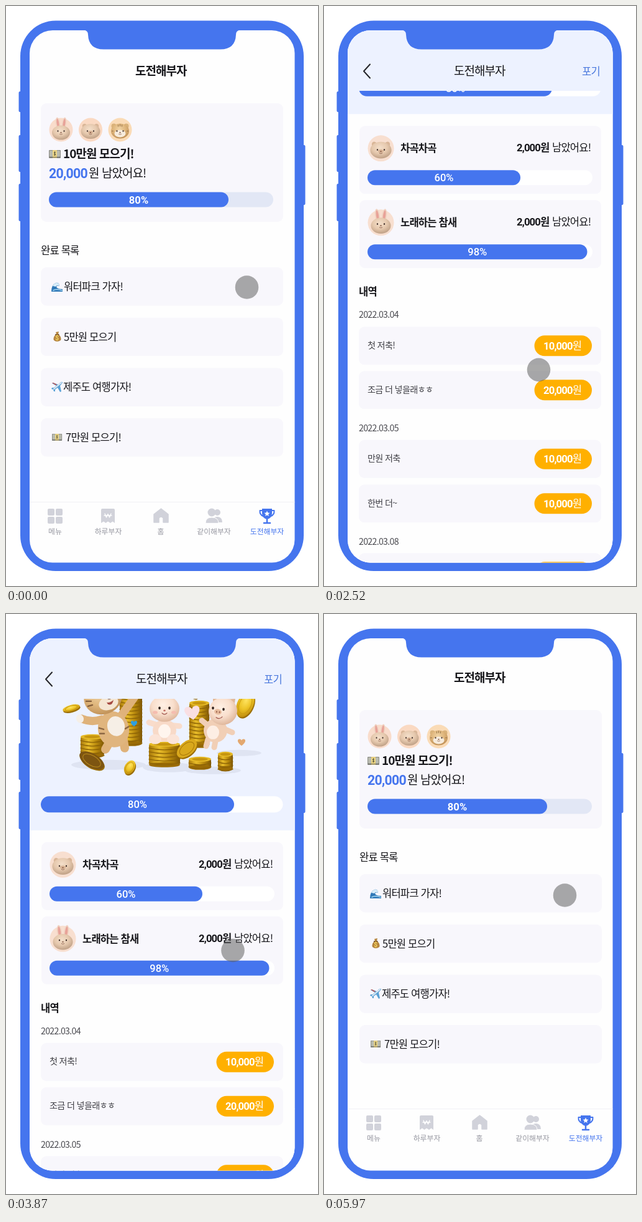
Animation, 502 px wide and 930 px high, one loop 6000 ms. Source, as an HTML page:

```html
<!DOCTYPE html>
<html lang="ko">
<head>
<meta charset="utf-8">
<style>
html, body { margin: 0; width: 100%; height: 100%; overflow: hidden; background: #fff; }
svg { display: block; }
text { font-family: 'Noto Sans CJK KR', 'Noto Sans CJK', 'Noto Sans', sans-serif; letter-spacing: -.05em; white-space: pre; }
.num { font-family: Roboto, 'Noto Sans CJK KR', 'Noto Sans CJK', sans-serif; }
.tab { letter-spacing: 0; }
</style>
</head>
<body>
<svg id="stage" width="502" height="930" viewBox="0 0 502 930"></svg>
<script>
const BLUE = '#4575ee', CARD = '#f8f7fc', SKY = '#edf2ff', INK = '#17171b', GREY = '#d1d2da';

// ---- drawing helpers ----
const rect = (x, y, w, h, r, fill) => `<rect x="${x}" y="${y}" width="${w}" height="${h}" rx="${r}" fill="${fill}"/>`;
const oval = (x, y, rx, ry, fill, rot = 0) =>
  `<ellipse rx="${rx}" ry="${ry}" fill="${fill}" transform="translate(${x} ${y}) rotate(${rot})"/>`;
const path = (d, fill, stroke = 'none', width = 0) =>
  `<path d="${d}" fill="${fill}" stroke="${stroke}" stroke-width="${width}" stroke-linecap="round" stroke-linejoin="round"/>`;
const line = (d, stroke, width) => path(d, 'none', stroke, width);
const at = (x, y, s, body) => `<g transform="translate(${x} ${y}) scale(${s})">${body}</g>`;
const text = (x, y, size, str, weight = 400, fill = INK, extra = '') =>
  `<text x="${x}" y="${y}" font-size="${size}" font-weight="${weight}" fill="${fill}" ${extra}>${str}</text>`;
const NUM = 'class="num"', TIGHT = 'class="num" style="letter-spacing:-.033em"';

function bar(x, y, w, h, done, label, back, weight) {
  return rect(x, y, w, h, h / 2, back) + rect(x, y, done, h, h / 2, BLUE) +
    text(x + done / 2, y + h / 2 + 6, 16.6, label, weight, '#fff',
      'class="num" style="letter-spacing:0" text-anchor="middle"');
}

// ---- small pictures ----
const bill = (x, y, s) => at(x, y, s,
  rect(0, 0, 19, 13, 1, '#8b8c86') + rect(1, 1, 17, 9.5, 1, '#b9bbb0') + rect(6, 0, 7, 13, 0, '#e3cb7c') +
  oval(9.5, 5.5, 3.4, 4, '#f2dd8e') +
  line('M11 4Q9.5 2.8 8.3 4Q8 5.5 9.5 5.8Q11.2 6.4 10.8 7.6Q9.5 8.6 8 7.6M9.5 2.5V8.8', '#5f5a3c', 1) +
  line('M1 11.7H18', '#6b6d68', 1));

const wave = at(73, 443, 1,
  path('M0 15Q0 4 7 1Q13 0 13 6Q10 4 8 7Q9 11 18 11V15Z', '#2f79b8') +
  path('M2 6Q6 -1 12 2Q13 4 13 6Q10 3 7 7Z', '#d9eefa') + line('M3 13Q8 10 17 13', '#a9daf3', 1.5));

const bag = at(76, 522, 1,
  path('M4 1L9 0L8 4Q14 9 12 14Q6 18 1 14Q-1 9 5 4Z', '#b5853f') + line('M3.5 5H9', '#6d451c', 1.5) +
  text(3.2, 14, 10, '$', 700, '#f5d560', NUM));

const plane = at(73, 602, 1,
  path('M1 3L3 2L11 5L15 1Q18 0 18 2L14 7L16 16L14 17L10 10L6 13L6 16L4 16L3 13L0 12L1 10L4 10L8 7Z', '#5aa2d6') +
  line('M4 12L16 2', '#dce8f2', 2) + path('M1 2L3 2L9 5L7 6Z', '#c9504a'));

const ear = (x, tilt) => oval(x, -10, 3.6, 10, '#f0d3c2', tilt) + oval(x, -10, 1.9, 8, '#e8a298', tilt);
const faces = {
  rabbit: ear(-5, -8) + ear(5, 8) + oval(0, 4.5, 14.5, 11.5, 'url(#clay)'),
  pig: oval(-9, -5, 4, 5, '#d9b698', -30) + oval(9, -5, 4, 5, '#d9b698', 30) +
    oval(0, 2.5, 15.5, 12, 'url(#clay)') + oval(0, 4, 4, 2.6, '#d8b496'),
  tiger: oval(-10, -6, 4, 4, '#d9b27a') + oval(10, -6, 4, 4, '#d9b27a') + oval(0, 2, 14.5, 12, 'url(#sand)') +
    oval(0, 6, 9, 6, '#f6ebdc') + line('M-3 -8V-5.5M0 -9V-6M3 -8V-5.5M-13 2H-11M13 2H11', '#9a774e', 1.1)
};
const avatar = (kind, x, y, r, back) => at(x, y, r / 19,
  oval(0, 0, 19, 19, back) + faces[kind] + oval(-5, 2, 1, 1.2, '#3a2a26') + oval(5, 2, 1, 1.2, '#3a2a26') +
  oval(0, 4.5, 1.2, .9, '#8b5f4c') + line('M-2 7Q0 8.5 2 7', '#8b5f4c', .8));

// ---- money illustration ----
function coin(x, y, rx, ry, rot, face = 'url(#coin)', rim = '#c99a10') {
  return oval(x + 1, y + 2, rx, ry, '#9a6d06', rot) + oval(x, y, rx, ry, face, rot) +
    `<ellipse rx="${rx * .72}" ry="${ry * .72}" fill="none" stroke="${rim}" transform="translate(${x} ${y}) rotate(${rot})"/>`;
}
function pile(x, top, bottom, half) {
  let out = rect(x - half, top, half * 2, bottom - top, 3, 'url(#pile)') + oval(x, bottom, half, 4, '#9b6c05');
  for (let y = top + 6; y < bottom + 2; y += 6)
    out += line(`M${x - half} ${y}Q${x} ${y + 6} ${x + half} ${y}`, '#8b6206', 1.3);
  return out + oval(x, top, half, 4, '#e5b925') + oval(x, top, half * .7, 2.4, '#c6950f');
}
const heart = (x, y, s, fill, rot = 0) =>
  `<g transform="translate(${x} ${y}) rotate(${rot}) scale(${s})">${path('M0 .9C-1.3 0 -1.2 -.9 -.55 -.9Q-.1 -.9 0 -.5Q.1 -.9 .55 -.9C1.2 -.9 1.3 0 0 .9Z', fill)}</g>`;

const tiger =
  line('M154 406Q138 412 122 405', '#dfb27a', 13) + oval(119, 405, 6, 7, '#f5efe8', -20) +
  line('M184 402L207 370', '#dfb27a', 13) + line('M168 440L160 454', '#dfb27a', 14) + line('M189 440L191 452', '#dfb27a', 14) +
  oval(173, 422, 25, 29, '#e0b57e', -12) + oval(177, 417, 14, 16, '#f6efe6', -12) +
  line('M150 420L157 422M151 429L158 429M197 418L192 421', '#8d6844', 2.5) +
  oval(132, 353, 9, 9, '#cf9f64') + oval(173, 346, 8, 8, '#cf9f64') +
  oval(156, 371, 31, 27, 'url(#sand)', -18) + oval(165, 380, 16, 11, '#f5e6d2', -18) +
  line('M144 350L148 357M151 347L154 354M159 346L160 351M128 370L136 371M129 377L137 377M132 385L139 383', '#85603c', 2.4) +
  oval(154, 369, 2, 2.6, '#30221e') + oval(171, 364, 2, 2.6, '#30221e') +
  oval(166, 372, 3, 2, '#61382c') + path('M162 379Q168 380 173 375Q171 385 164 382Z', '#a64b43');

const rabbit =
  oval(241, 350, 7, 22, '#f9ddce', -7) + oval(269, 356, 7, 20, '#f9ddce', 14) +
  oval(241, 350, 4, 18, '#ee8f86', -7) + oval(269, 356, 4, 16, '#ee8f86', 14) +
  line('M243 415L230 411M268 416L279 417', '#f9dccb', 9) +
  oval(255, 424, 19, 18, '#f8dac8') + oval(255, 425, 10, 11, '#fff5ee') +
  oval(240, 438, 10, 8, '#fbe4d8') + oval(269, 438, 10, 8, '#fbe4d8') +
  oval(255, 389, 24, 21, 'url(#cream)') + oval(247, 388, 1.8, 2.4, '#30221e') + oval(263, 388, 1.8, 2.4, '#30221e') +
  oval(240, 395, 4, 2.5, '#f5bdb0') + oval(270, 395, 4, 2.5, '#f5bdb0') +
  oval(255, 392, 1.8, 1.3, '#bf6b60') + line('M251 396Q255 400 259 396', '#9e544b', 1.3);

const pig =
  line('M325 416L315 408M350 421L364 427M325 438L322 449M337 441L335 451', '#f1cfb6', 9) +
  oval(337, 424, 19, 19, '#f1cfb6') + oval(333, 427, 10, 11, '#fdeee4') +
  path('M333 383L333 370L348 373Z', '#e2b897') + path('M356 374L369 373L367 386Z', '#e2b897') +
  oval(349, 393, 23, 22, 'url(#cream)', -10) + oval(341, 394, 6, 4.5, '#e8bd9f', 10) +
  oval(339, 394, 1, 1.6, '#9b6350') + oval(343.5, 394.5, 1, 1.6, '#9b6350') +
  oval(333, 388, 1.8, 2.3, '#30221e') + oval(350, 390, 1.8, 2.3, '#30221e') +
  line('M338 403Q343 407 348 402', '#9e544b', 1.3);

const scene =
  oval(165, 479, 60, 8, '#dfe4f2') + oval(262, 483, 42, 8, '#dfe4f2') + oval(375, 460, 36, 5, '#dfe4f2') + oval(333, 488, 45, 6, '#dfe4f2') +
  pile(201, 354, 445, 18) + pile(139, 434, 464, 19) + pile(311, 380, 448, 16) + pile(255, 446, 479, 25) +
  pile(312, 470, 483, 18) + pile(353, 462, 485, 12) +
  coin(177, 314, 13, 15, 10) + coin(205, 338, 13, 6, -30) + coin(105, 388, 14, 5, -15) +
  coin(138, 472, 22, 11, 30, '#7d5511', '#b98a1c') +
  coin(199, 483, 8, 12, 30) + coin(320, 341, 13, 5, -22) + coin(298, 364, 12, 5, 40) + coin(385, 382, 13, 22, 25) +
  tiger + rabbit + pig + coin(291, 453, 19, 11, -40, '#d9a81c', '#a87808') +
  heart(150, 334, 5, '#f3ce3e') + heart(211, 357, 8, '#dba671', -15) + heart(206, 413, 5, '#2d9fe0') +
  heart(291, 329, 6, '#2d9fe0') + heart(300, 396, 12, '#f9dfe3', -8) + heart(353, 358, 5, '#f3d13c') + heart(379, 443, 6, '#e3a870');

// ---- screens ----
const goals = [['워터파크 가자!', 93], ['5만원 모으기', 93], ['제주도 여행가자!', 92], ['7만원 모으기!', 96]];
const tabs = [['메뉴', 79], ['하루부자', 164.5], ['홈', 249], ['같이해부자', 334.5], ['도전해부자', 420]];
const tabIcons =
  [[67, 806], [80, 806], [67, 819], [80, 819]].map(([x, y]) => rect(x, y, 11, 11, 2, GREY)).join('') +
  path('M153 808Q153 806 155 806H173Q175 806 175 808V829L171.5 826.5L168 829L164 826.5L160.5 829L157 826.5L153 829Z', GREY) +
  line('M159 814L161.5 820L164 814.5L166.5 820L169 814M158 817H170', '#fff', 1.3) +
  path('M238 815L249.5 806L261 815V828H253V821Q249.5 817 246 821V828H238Z', GREY, GREY, 1.5) +
  oval(340, 812, 5, 5, GREY) + path('M333 828Q333 818 341 819Q348 820 348 828Z', GREY) +
  oval(331, 812, 6.5, 6.5, GREY) + path('M321 829Q321 820 331 820Q342 820 342 829Z', GREY, '#fefefe', 1) +
  path('M412 806H428V814Q427 822 420 823Q413 822 412 814Z', BLUE) +
  line('M412 809H408.5Q408 816 414 818M428 809H431.5Q432 816 426 818', BLUE, 2) +
  line('M420 823V828M415 829H425', BLUE, 2.5) +
  path('M420 809.5L421.3 812.5L424.5 812.8L422 815L422.8 818L420 816.3L417.2 818L418 815L415.5 812.8L418.7 812.5Z', '#fff');

const list =
  text(208, 110.5, 19, '도전해부자', 600) +
  rect(56, 156, 390, 190, 9, CARD) +
  avatar('rabbit', 88.5, 198.5, 19, '#f9dccb') + avatar('pig', 136, 198.5, 19, '#fad9c2') + avatar('tiger', 183.5, 198.5, 19, '#fadbb6') +
  bill(69, 231, 1) + text(92, 244, 19, '10만원 모으기!', 700) +
  text(69, 276, 21.3, '20,000', 700, BLUE, TIGHT) + text(133, 275, 19, '원 남았어요!') +
  bar(69, 298.5, 361, 24, 289, '80%', '#e2e7f5', 700) +
  text(56, 398, 16.6, '완료 목록') +
  goals.map(([s, x], i) => rect(56, 419 + i * 80.7, 390, 61.5, 9, CARD) + text(x, 456 + i * 80.7, 16.6, s)).join('') +
  wave + bag + plane + bill(74, 686, .85) +
  rect(38, 795, 427, 1, 0, '#f1f1f5') + tabIcons +
  tabs.map(([s, x], i) => text(x, 847, 11.85, s, 400, i === 4 ? BLUE : '#9697a0', 'class="tab" text-anchor="middle"')).join('');

const friend = (kind, name, y, done, label) =>
  rect(57, y, 389, 109, 9, CARD) + avatar(kind, 91.5, y + 36, 21, '#f8dfd0') +
  text(123, y + 42, 16.6, name, 700) +
  text(310, y + 41, 16.6, '2,000원', 700, INK, NUM) + text(367, y + 41, 16.6, '남았어요!') +
  bar(70, y + 71, 362, 24, done, label, '#fff', 500);

const date = (y, s) => text(56, y, 14.2, s, 400, '#4a4a50');
const saving = (y, memo, sum) =>
  rect(56, y, 390, 61, 9, CARD) + text(70, y + 34.5, 14.2, memo, 400, '#3f3f45') +
  rect(338.5, y + 14, 92.5, 33, 16.5, '#ffb000') +
  text(353, y + 36.5, 16.6, `${sum}<tspan font-weight="300">원</tspan>`, 700, '#fff', NUM);

const detail =
  rect(38, 30, 427, 554, 0, SKY) +
  bill(167, 165.5, 1.2) + text(195, 183, 23.7, '10만원 모으기!', 700) +
  text(170, 220, 23.7, '20,000', 700, INK, TIGHT) + text(241, 218.5, 19, '원 남았어요!') +
  avatar('rabbit', 204, 259, 19, '#f9e2d5') + avatar('pig', 252, 259, 19, '#fadfce') + avatar('tiger', 299, 259, 19, '#fae0c9') +
  scene + bar(56, 529.5, 389.5, 26, 311, '80%', '#fff', 500) +
  friend('pig', '차곡차곡', 603, 246, '60%') + friend('rabbit', '노래하는 참새', 722, 353.5, '98%') +
  text(56, 875, 16.6, '내역', 700) +
  date(911, '2022.03.04') + saving(925, '첫 저축!', '10,000') + saving(996, '조금 더 넣을래ㅎㅎ', '20,000') +
  date(1093, '2022.03.05') + saving(1106.5, '만원 저축', '10,000') + saving(1178, '한번 더~', '10,000') +
  date(1274.5, '2022.03.08') + saving(1288, '오늘도 힘내부자!', '20,000') +
  date(1385, '2022.03.09') + saving(1399, '이제 얼마 안남았다!!', '10,000');

const header = rect(38, 30, 427, 106, 0, SKY) + line('M74 93.5L64 104.5L74 115.5', '#26262b', 2) +
  text(209, 111, 19, '도전해부자', 500) + text(415, 111, 16.6, '포기', 400, '#4a78dd');

const stops = list => list.map((c, i) => `<stop offset="${i / (list.length - 1)}" stop-color="${c}"/>`).join('');
const glow = (id, ...c) => `<radialGradient id="${id}" cx=".45" cy=".35" r=".7">${stops(c)}</radialGradient>`;

document.getElementById('stage').innerHTML = `
<defs>
  ${glow('cream', '#fff0e4', '#f9dfcd', '#dbb094')}${glow('clay', '#f4dfca', '#e6c9ae', '#b99a80')}
  ${glow('sand', '#f0d3a4', '#dfb67c', '#bb8b52')}${glow('coin', '#ffe460', '#edc326', '#b98609')}
  <linearGradient id="pile">${stops(['#a87808', '#e9bd2a', '#b98a0d', '#7d5504'])}</linearGradient>
  <clipPath id="screen"><rect x="38" y="39" width="426.5" height="853.5" rx="37"/></clipPath>
  <clipPath id="below"><rect x="38" y="136" width="427" height="760"/></clipPath>
</defs>
${rect(20.5, 137, 6, 33, 2, BLUE)}${rect(20.5, 207, 6, 59, 2, BLUE)}${rect(20.5, 285, 6, 60, 2, BLUE)}${rect(475, 223, 6.5, 96, 2, BLUE)}
${rect(23, 23.5, 456, 882.5, 57, BLUE)}
<g clip-path="url(#screen)">
  ${rect(38, 39, 427, 854, 0, '#fefefe')}
  <g id="list">${list}</g>
  <g id="detail">${rect(38, 39, 427, 854, 0, '#fefefe')}<g clip-path="url(#below)"><g id="scroll">${detail}</g></g>${header}</g>
</g>
${path('M125 38.5Q132 39 132 46Q133 69.5 157 69.5H345Q369 69.5 370 46Q370 39 377 38.5Z', BLUE)}
<circle id="touch" r="18.8" fill="rgba(92,92,92,.52)"/>`;

// ---- motion: smooth monotone curves through [ms, value] keys ----
function track(keys, t) {
  const last = keys.length - 1;
  if (t <= keys[0][0]) return keys[0][1];
  if (t >= keys[last][0]) return keys[last][1];
  const i = keys.findIndex(k => k[0] > t) - 1;
  const rate = n => (keys[n + 1][1] - keys[n][1]) / (keys[n + 1][0] - keys[n][0]);
  const slope = n => {
    if (n === 0 || n === last) return 0;
    const a = rate(n - 1), b = rate(n);
    return a * b <= 0 ? 0 : 2 * a * b / (a + b);
  };
  const [t0, a] = keys[i], [t1, b] = keys[i + 1], d = t1 - t0, u = (t - t0) / d;
  const mix = u * u * (3 - 2 * u);
  return a + (b - a) * mix + d * u * (1 - u) * (slope(i) * (1 - u) - slope(i + 1) * u);
}

const touchX = [[180, 387.5], [990, 345.5], [3300, 345.5], [3870, 365], [4230, 375], [4440, 261.5], [4720, 68], [5175, 68], [5970, 387.5]];
const touchY = [[180, 451], [990, 268], [1920, 268], [2260, 720], [2520, 584], [3045, 100], [3090, 100], [3300, 286],
  [3870, 539], [4230, 722], [4440, 495], [4720, 104], [5175, 104], [5970, 451]];
const scrollY = [[2100, 0], [2520, 410], [2850, 568], [3430, 568], [3690, 452], [3870, 238], [4230, -1]];
const fade = [[1200, 0], [1800, 1], [4860, 1], [5460, 0]];

const el = id => document.getElementById(id);
const listEl = el('list'), detailEl = el('detail'), scrollEl = el('scroll'), touch = el('touch');

function draw(now) {
  const t = now % 6000;
  listEl.setAttribute('transform', t < 3000 ? '' : 'translate(1 -2)');
  detailEl.setAttribute('opacity', track(fade, t));
  scrollEl.setAttribute('transform', `translate(0 ${-track(scrollY, t)})`);
  touch.setAttribute('cx', track(touchX, t));
  touch.setAttribute('cy', track(touchY, t));
}
const start = performance.now();
function loop() {
  draw(performance.now() - start);
  requestAnimationFrame(loop);
}
loop();
</script>
</body>
</html>
```
